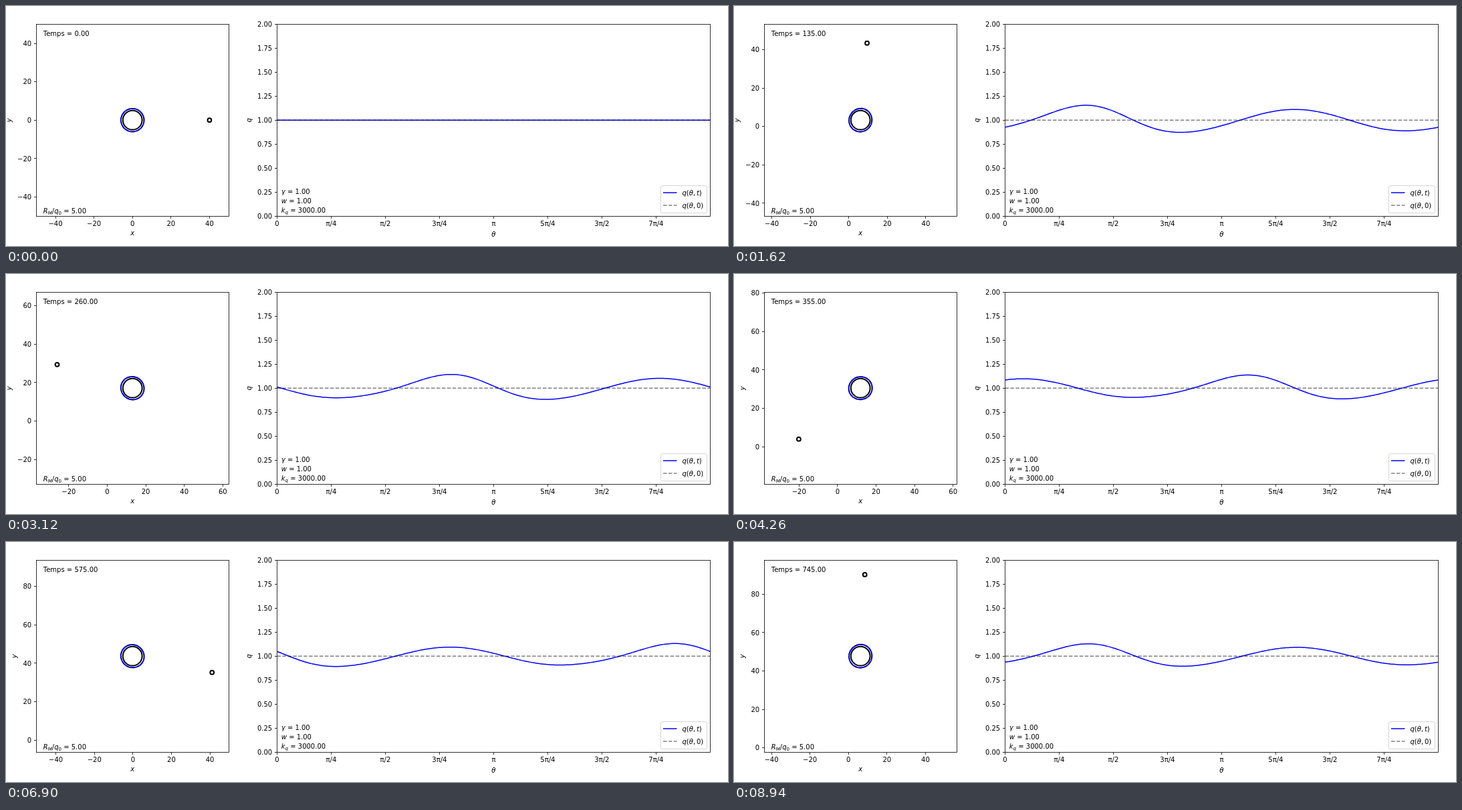
An HTML page for the animation above (9000 ms loop, 1080 by 360 pixels).

```html
<!DOCTYPE html>
<html lang="fr">
<head>
<meta charset="utf-8">
<style>
html, body { margin: 0; width: 100%; height: 100%; overflow: hidden; background: #fff; }
svg { display: block; font: 10px "DejaVu Sans", sans-serif; white-space: pre; }
.axis { fill: none; stroke: #000; stroke-width: .8; }
.ring { fill: none; stroke: #000; stroke-width: 2; }
.q { fill: none; stroke: #00f; stroke-width: 1.5; }
.rest { fill: none; stroke: #000; stroke-opacity: .5; stroke-width: 1.5; stroke-dasharray: 5.55 2.4; }
i, .i { font-style: italic; }
.sub { font-size: 7px; }
</style>
</head>
<body>
<svg width="1080" height="360" viewBox="0 0 1080 360"><g id="moving"></g><g id="fixed"></g></svg>
<script>
const FRAME = 60, COUNT = 150, STEP = 5;
const CX = 189.2, CY = 171.2, UNIT = 2.88;        // left plot, centred on the planet
const X0 = 405.4, WIDTH = 648, Y0 = 315.2, QUNIT = 144; // right plot
const MASS = 0.1655, RELAX = 40;
// cosine and sine parts of the tidal wave, harmonics 1 to 5
const WAVE = [[.0058, -.0014], [.0842, -.0863], [.014, -.0083], [.0069, -.0061], [.0012, -.0021]];
const { sin, cos, floor, ceil, PI } = Math;

const snap = v => floor(v) + .5;
const text = (x, y, s, anchor = 'start') => `<text x="${x}" y="${y}" text-anchor="${anchor}">${s}</text>`;
const it = s => `<tspan class="i">${s}</tspan>`;
const sub = (s, cls = '') => `<tspan class="sub ${cls}" dy="1.6">${s}</tspan><tspan dy="-1.6">\u200b</tspan>`;
const path = (cls, d) => `<path class="${cls}" d="${d}"/>`;
const circle = (cls, x, y, r) => `<circle class="${cls}" cx="${x}" cy="${y}" r="${r}"/>`;
const xTick = (x, s) => path('axis', `M${snap(x)} 315.5v3.5`) + text(x, 330, s, 'middle');
const yTick = (left, y, s) => path('axis', `M${left} ${snap(y)}h-3.5`) + text(left - 7.3, y + 3.7, s, 'end');
const upright = (x, y, s) => `<text class="i" transform="translate(${x} ${y}) rotate(-90)" text-anchor="middle">${s}</text>`;
const frameBox = (x, w) => `<rect class="axis" x="${x}" y="27.5" width="${w}" height="288"/>`;
const num = v => String(v).replace('-', '\u2212');

const radius = (t, a) => 40 + .0037 * t - .3 * sin(a) + .07 * (1 - cos(a));

// orbital angle of the moon at every step
const angles = [0];
for (let n = 0, a = 0; n < COUNT; n++) {
  for (let k = 0; k < 20; k++) {
    const t = (n + k / 20) * STEP;
    a += (17.61 + .00122 * t - 7e-7 * t * t) / radius(t, a) ** 2 * STEP / 20;
  }
  angles.push(a);
}

const wave = p => WAVE.reduce((s, [c, d], m) => s + c * cos((m + 1) * p) + d * sin((m + 1) * p), .0012);

function line(n, point) {
  let d = '';
  for (let k = 0; k <= n; k++) d += (k ? 'L' : 'M') + point(k / n).map(v => v.toFixed(2));
  return d;
}

function drawFixed() {
  const names = ['0', 'π/4', 'π/2', '3π/4', 'π', '5π/4', '3π/2', '7π/4'];
  let s = frameBox(45.5, 288) + frameBox(405.5, 648);
  names.forEach((name, k) => s += xTick(X0 + k * WIDTH / 8, name));
  for (let q = 0; q <= 2; q += .25) s += yTick(405.5, Y0 - q * QUNIT, q.toFixed(2));
  s += text(189.3, 344, it('x'), 'middle') + text(729.3, 346, it('θ'), 'middle') + upright(367, 171.3, 'q');
  s += text(55.8, 311, it('R') + sub('M', 'i') + '/' + it('q') + sub('0') + ' = 5.00');
  s += text(411.8, 282, it('γ') + ' = 1.00') + text(411.8, 296, it('w') + ' = 1.00');
  s += text(411.8, 310, it('k') + sub('q', 'i') + ' = 3000.00');
  s += '<rect x="979.5" y="269.5" width="69" height="41" rx="2" fill="#fff" fill-opacity=".8" stroke="#ccc" stroke-opacity=".8"/>';
  s += path('q', 'M983 280H1003.5') + path('rest', 'M983 299H1003.5');
  [['t', 283.5], ['0', 302.5]].forEach(([v, y]) => {
    s += text(1011.5, y, `${it('q')}(${it('θ')},<tspan dx="1.8">${v === 't' ? it(v) : v}</tspan>)`);
  });
  return s;
}

function drawMoving(n) {
  const t = n * STEP, a = angles[n], r = radius(t, a);
  const mx = r * cos(a), my = r * sin(a);
  const px = MASS * (40 - mx), py = MASS * (.4454 * t - 1.3e-6 * t * t - my);
  const size = (40.28 / r) ** 3, fade = Math.exp(-t / RELAX);
  const q = p => 1 + size * wave(p - a) - fade * wave(p) * (n ? 1 : size);

  let s = '';
  for (let v = 20 * ceil((px - 50) / 20); v <= px + 50; v += 20) s += xTick(CX + (v - px) * UNIT, num(v));
  const low = 20 * ceil((py - 50) / 20);
  for (let v = low; v <= py + 50; v += 20) s += yTick(45.5, CY - (v - py) * UNIT, num(v));
  s += upright(low < 0 ? 8 : 16.4, 171.3, 'y');

  s += circle('ring', CX, CY, 5 * UNIT);
  s += `<path class="q" style="stroke-width:2" d="${line(120, u => {
    const p = 2 * PI * u, d = (5 + q(p)) * UNIT;
    return [CX + d * cos(p), CY - d * sin(p)];
  })}"/>`;
  s += circle('rest', CX, CY, 6 * UNIT);
  s += circle('ring', CX + mx * UNIT, CY - my * UNIT, UNIT);
  s += text(55.8, 45, `Temps = ${t.toFixed(2)}`);

  s += path('q', line(240, u => [X0 + u * WIDTH, Y0 - QUNIT * q(2 * PI * u)]));
  s += path('rest', `M${X0} 171.2h${WIDTH}`);
  return s;
}

const moving = document.getElementById('moving');
document.getElementById('fixed').innerHTML = drawFixed();
let shown = -1;
const start = performance.now();
function tick() {
  const n = floor((performance.now() - start) / FRAME) % COUNT;
  if (n !== shown) moving.innerHTML = drawMoving(shown = n);
  requestAnimationFrame(tick);
}
tick();
</script>
</body>
</html>
```
